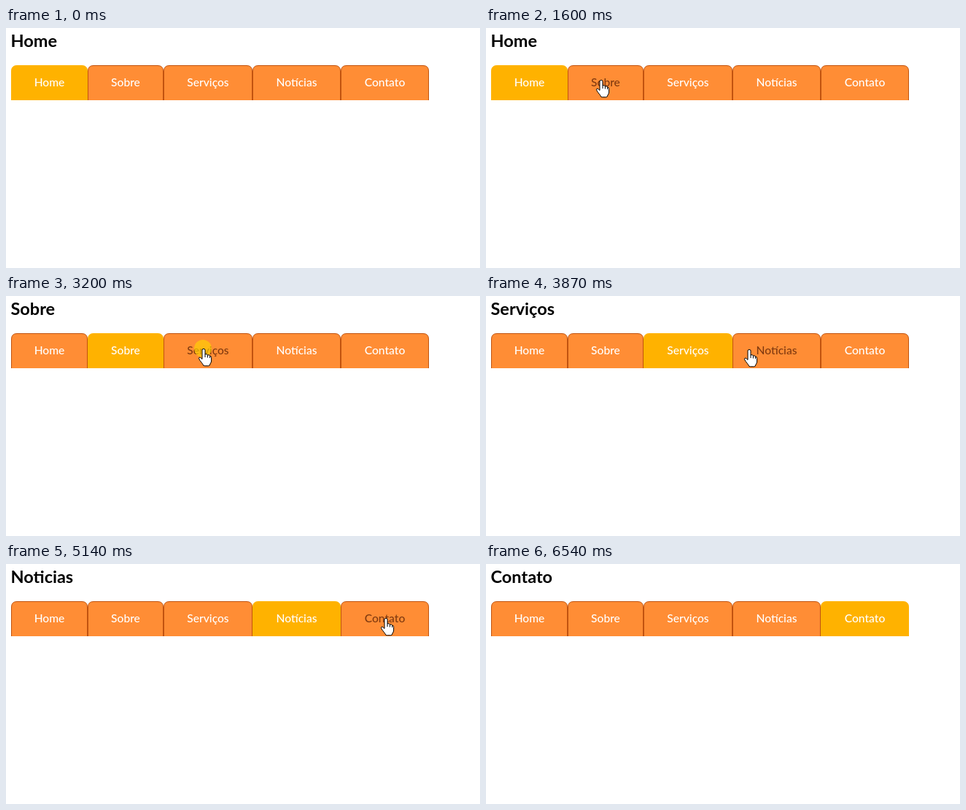
Animation, 650 px wide and 329 px high, one loop 7.07 s. Source, as an HTML page:

```html
<!DOCTYPE html>
<html lang="pt">
<head>
<meta charset="utf-8">
<title>Menu</title>
<style>
html, body { margin: 0; width: 100%; height: 100%; overflow: hidden; background: #fff; }
svg { display: block; width: 650px; height: 329px; font-family: Lato, "Open Sans", sans-serif; }
#title { font-size: 23.5px; font-weight: 700; }
.label { font-size: 15.6px; font-weight: 500; text-anchor: middle; fill: #fff; }
.label.hover { fill: #803a10; }
.tab { fill: #ff8d35; stroke: #c1530f; }
.tab.active { fill: #ffb200; stroke: #ffb200; }
</style>
</head>
<body>
<svg id="stage" viewBox="0 0 650 329">
  <text id="title" x="6.5" y="26"></text>
  <g id="menu"></g>
  <circle id="press" r="12" fill="#ffd700" fill-opacity=".62"/>
  <g id="cursor" fill="#fff" stroke="#000" stroke-linejoin="round">
    <g id="hand">
      <path d="M-2 13.5V1Q-2-.5 0-.5Q2-.5 2 1V6.8Q5 6 5.4 8Q8.2 7 8.6 9.2Q10.6 9 10.6 11.5V16Q10.6 18 9 20Q8.6 22.8 6.5 22.8H1.5Q-.6 22.8-1 20.8Q-2.5 18.5-5 15.5Q-7.5 12.2-6 11.2Q-4.5 10.5-2 13.5Z"/>
      <path d="M2 6.5V11M5.4 8V11.5M8.6 9.2V12" fill="none"/>
    </g>
    <path id="arrow" d="M.5.5V16.5L4.3 13L7 18.8L9.4 17.7L6.8 12H11.6Z"/>
  </g>
</svg>
<script>
const LOOP = 7070, STEP = 200 / 3;
const TOP = 51, BOTTOM = 99;
const labels = ["Home", "Sobre", "Serviços", "Notícias", "Contato"];
const titles = ["Home", "Sobre", "Serviços", "Noticias", "Contato"];
const edges = [7, 112, 216, 338, 459, 580];

// first step, last step, end x, end y, downward bow
const START = [580, 325];
const moves = [
  [4, 12, 100, 90, 0],
  [13, 14, 122, 79, 0],
  [15, 18, 155, 72, 0],
  [24, 25, 160, 71, 0],
  [36, 41, 271, 73, 0],
  [55, 60, 392, 68, 6],
  [73, 77, 521, 75, 0],
  [88, 98, 588, 325, 0]
];
// press, release, page change
const clicks = [[28, 30, 31], [48, 51, 52], [65, 68, 69], [80, 82, 83]];

const $ = id => document.getElementById(id);

function add(tag, attrs) {
  const el = document.createElementNS("http://www.w3.org/2000/svg", tag);
  for (const name in attrs) el.setAttribute(name, attrs[name]);
  return $("menu").appendChild(el);
}

const tabs = labels.map((text, i) => {
  const a = edges[i] + 0.5, b = edges[i + 1] - 0.5;
  const shape = add("path", {
    class: "tab",
    d: `M${a} ${BOTTOM}V${TOP + 8}q0-7.5 7.5-7.5H${b - 7.5}q7.5 0 7.5 7.5V${BOTTOM}`
  });
  const label = add("text", { class: "label", x: (a + b) / 2, y: 80 });
  label.textContent = text;
  return { shape, label };
});

function pointerAt(k) {
  let [x, y] = START;
  for (const [first, last, toX, toY, bow] of moves) {
    if (k < first) break;
    const p = Math.min(1, (k - first + 1) / (last - first + 1));
    const s = p * p * (3 - 2 * p);
    x += (toX - x) * s;
    y += (toY - y) * s + bow * Math.sin(Math.PI * p);
  }
  return [Math.round(x), Math.round(y)];
}

const show = (el, on) => el.setAttribute("visibility", on ? "visible" : "hidden");

function draw(time) {
  const k = Math.floor((time % LOOP + 17) / STEP);
  const [x, y] = pointerAt(k);
  const present = k >= 4 && k < 98;
  const inMenu = present && y >= TOP && y < BOTTOM;
  const page = clicks.filter(c => k >= c[2]).length;
  let over = false;

  tabs.forEach(({ shape, label }, i) => {
    const hover = inMenu && x >= edges[i] && x < edges[i + 1];
    over = over || hover;
    shape.classList.toggle("active", i === page);
    label.classList.toggle("hover", hover);
  });
  $("title").textContent = titles[page];

  $("cursor").setAttribute("transform", `translate(${x} ${y})`);
  show($("hand"), present && over);
  show($("arrow"), present && !over);
  $("press").setAttribute("cx", x - 1);
  $("press").setAttribute("cy", y - 1);
  show($("press"), clicks.some(c => k >= c[0] && k < c[1]));
}

const begin = performance.now();
function tick() {
  draw(performance.now() - begin);
  requestAnimationFrame(tick);
}
tick();
</script>
</body>
</html>
```
